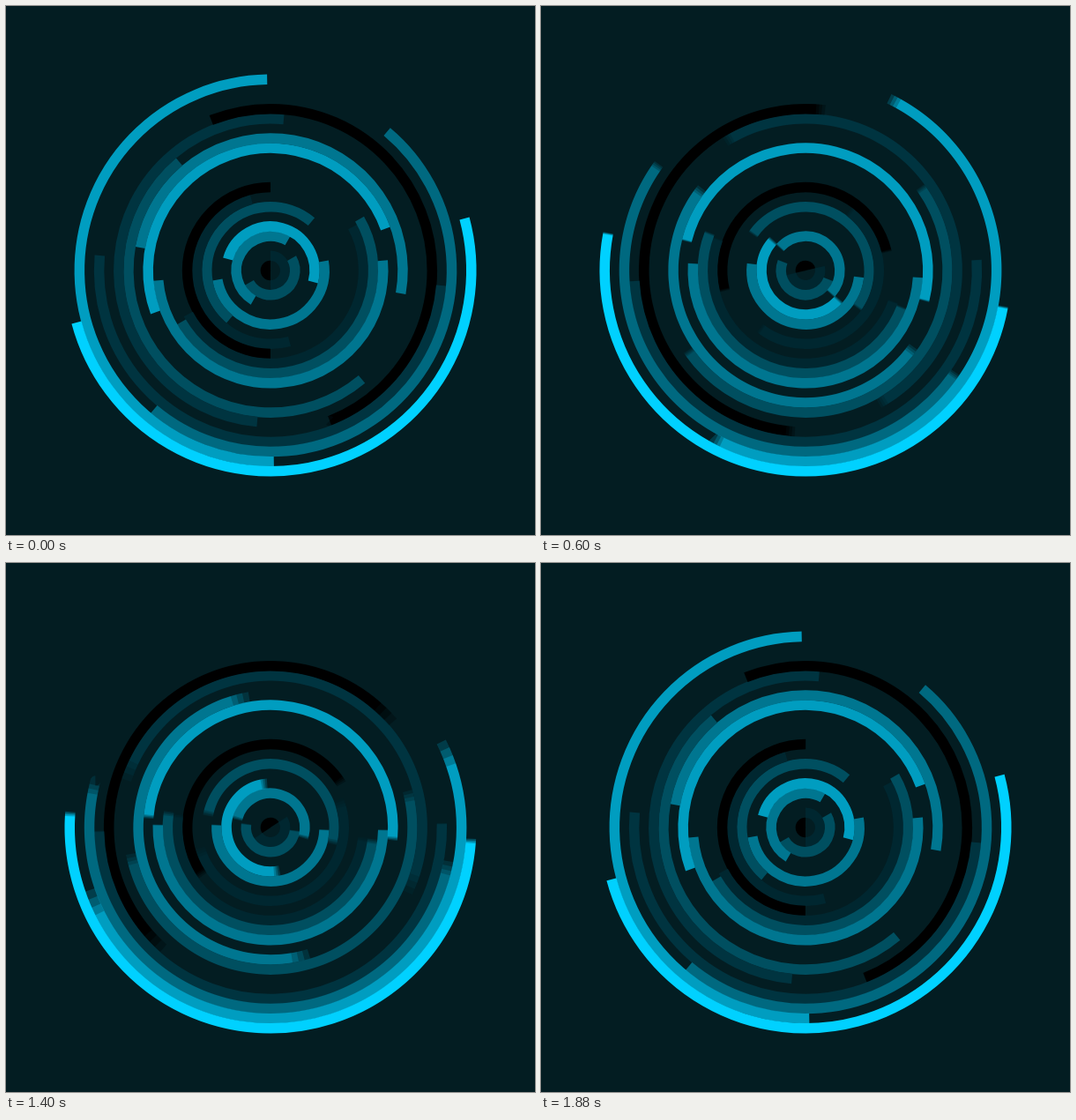
An HTML page with a canvas for the animation above (1.92 s loop, 600x600 px).

```html
<!DOCTYPE html>
<html lang="en">
<head>
<meta charset="utf-8">
<title>Swinging half rings</title>
<style>
html, body { margin: 0; width: 100%; height: 100%; overflow: hidden; background: #031d22; }
canvas { display: block; width: 100vmin; height: 100vmin; margin: auto; }
</style>
</head>
<body>
<canvas id="stage" width="600" height="600"></canvas>
<script>
const SIZE = 600, LOOP = 1920, STEP = 40;
const SAMPLES = 4, SAMPLE_GAP = 4;   // motion blur, ms between exposures
const BAND = SIZE / 54;

// Resting angle of each half ring in degrees, from the centre outwards
const REST = [90, -90, -30, 120, 195, -10, 130, 75, 90, -28, -30,
              -5, 160, 190, 50, 95, 248.5, 5, -50, 89, -15];

// Upright rings make a quarter turn, those past half a turn swing half a turn back,
// all others swing to their mirror image across the horizontal axis.
function farAngle(rest) {
  if (rest % 90 === 0) return rest + 90;
  if (rest > 180) return rest - 180;
  return 360 * Math.round(rest / 180) - rest;
}

// Brightness rises and falls every eight rings, stronger towards the rim
function ringColor(i) {
  const level = 4 - Math.abs(i % 8 - 4);
  const blue = Math.min(255, level * (i > 14 ? 64 : 48));
  return `rgb(0, ${Math.round(blue * 0.82)}, ${blue})`;
}

const rings = REST.map((rest, i) => ({
  rest,
  turn: farAngle(rest) - rest,
  radius: (i + 0.5) * BAND,
  color: ringColor(i)
}));

const ctx = document.getElementById('stage').getContext('2d');
const layer = document.createElement('canvas');
layer.width = layer.height = SIZE;
const pen = layer.getContext('2d');
pen.lineWidth = BAND + 0.4;   // slight overlap hides the seams
pen.fillStyle = '#031d22';

// 0 -> 1 -> 0 over one loop, lingering at both ends
function swing(time) {
  const c = Math.cos(2 * Math.PI * time / LOOP);
  return (1 - Math.atan(3 * c) / Math.atan(3)) / 2;
}

function drawRings(time) {
  const p = swing(time);
  pen.fillRect(0, 0, SIZE, SIZE);
  for (const { rest, turn, radius, color } of rings) {
    const a = (rest + turn * p) * Math.PI / 180;
    pen.strokeStyle = color;
    pen.beginPath();
    pen.arc(SIZE / 2, SIZE / 2, radius, a, a + Math.PI);
    pen.stroke();
  }
}

const begin = performance.now();

function render() {
  const elapsed = (performance.now() - begin) % LOOP;
  const time = Math.floor(elapsed / STEP) * STEP;
  for (let i = 0; i < SAMPLES; i++) {
    drawRings(time + i * SAMPLE_GAP);
    ctx.globalAlpha = 1 / (i + 1);   // running average of the exposures
    ctx.drawImage(layer, 0, 0);
  }
  requestAnimationFrame(render);
}
render();
</script>
</body>
</html>
```
